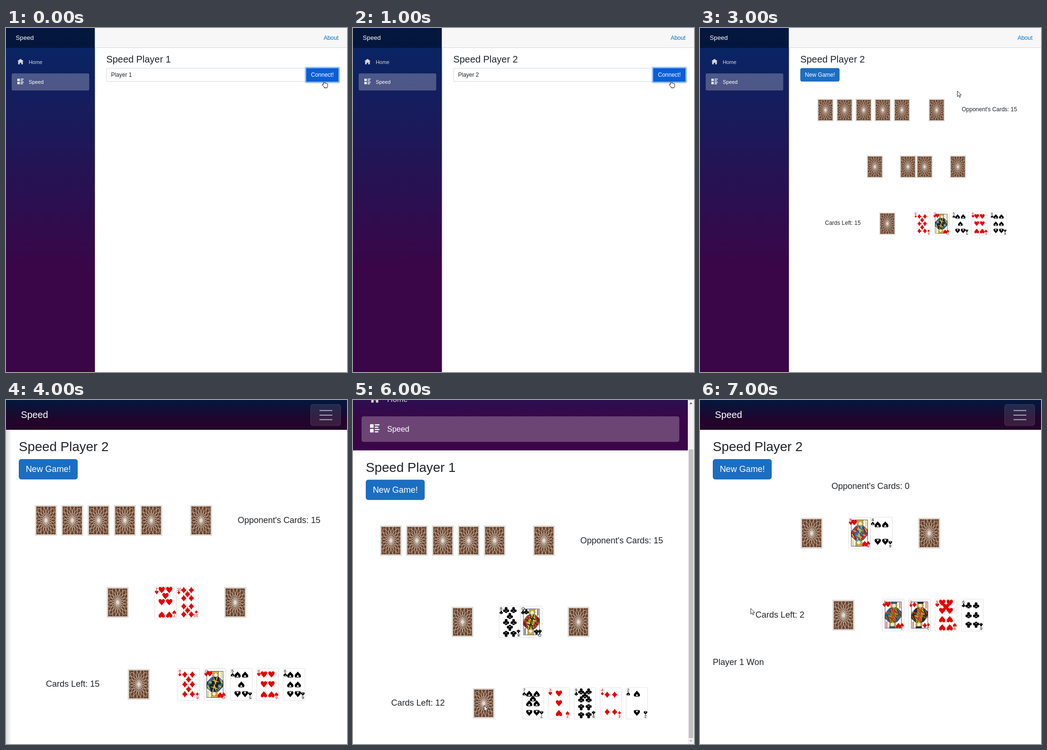
An HTML page that plays this animation: 719 px wide and 727 px high, repeating every 8 s.

```html
<!DOCTYPE html>
<html lang="en">
<head>
<meta charset="utf-8">
<title>Speed</title>
<style>
  html, body { margin: 0; width: 100%; height: 100%; overflow: hidden; background: #fff; }
  svg { display: block; width: 719px; height: 727px; font-family: "Liberation Sans", Arial, sans-serif; }
  .scene { visibility: hidden; animation: show 8s step-end infinite; }
  @keyframes show {
    0% { visibility: visible; }
    12.5%, 100% { visibility: hidden; }
  }
</style>
</head>
<body>
<svg id="stage" viewBox="0 0 719 727"></svg>
<script>
const INK = '#212529', RED = '#e60000';

const rect = (x, y, w, h, fill, extra = '') =>
  `<rect x="${x}" y="${y}" width="${w}" height="${h}" fill="${fill}" ${extra}/>`;
const text = (x, y, size, str, fill = INK, extra = '') =>
  `<text x="${x}" y="${y}" font-size="${size}" fill="${fill}" ${extra}>${str}</text>`;
const path = (d, fill, extra = '') => `<path d="${d}" fill="${fill}" ${extra}/>`;
const at = (x, y, scale, inner) => `<g transform="translate(${x} ${y}) scale(${scale})">${inner}</g>`;
const flipped = inner => `<g transform="rotate(180 23.25 34)">${inner}</g>`;

// Suits are drawn in a 10 unit box around the origin.
const stem = 'M-.7 1L-2 5H2L.7 1z';
const suits = {
  H: 'M0 5C-2 2-5 .3-5-2.2A2.55 2.55 0 0 1 0-3.2A2.55 2.55 0 0 1 5-2.2C5 .3 2 2 0 5z',
  D: 'M0-5.3Q1.8-2 4.4 0Q1.8 2 0 5.3Q-1.8 2-4.4 0Q-1.8-2 0-5.3z',
  S: 'M0-5C2-2 5-.3 5 1.8A2.4 2.4 0 0 1 0 2.8A2.4 2.4 0 0 1-5 1.8C-5-.3-2-2 0-5z' + stem,
  C: 'M-2.3-2.6a2.3 2.3 0 1 1 4.6 0a2.3 2.3 0 1 1-4.6 0zM-5 1.3a2.3 2.3 0 1 1 4.6 0a2.3 2.3 0 1 1-4.6 0z' +
     'M.4 1.3a2.3 2.3 0 1 1 4.6 0a2.3 2.3 0 1 1-4.6 0zM-1-1H1V2H-1z' + stem
};
const colorOf = suit => 'HD'.includes(suit) ? RED : '#000';
const pip = (suit, x, y, size, down) =>
  `<g transform="translate(${x} ${y}) scale(${size / 10})${down ? ' rotate(180)' : ''}">${path(suits[suit], colorOf(suit))}</g>`;

// Middle-column pips as fractions of the pip height.
const middles = { 2: [0, 1], 3: [0, .5, 1], 5: [.5], 7: [.25], 8: [.25, .75], 9: [1 / 6], 10: [1 / 6, 5 / 6] };
const tall = ['7H', '8C', '9H', '9C', '10D'];

function pips(rank, suit) {
  const top = tall.includes(rank + suit) ? 8.3 : rank == 4 ? 15.5 : 13.3;
  const put = (x, v) => pip(suit, x, top + v * (68 - 2 * top), 13, v > .5);
  const rows = rank < 4 ? 0 : rank < 6 ? 2 : rank < 9 ? 3 : 4;
  let out = (middles[rank] || []).map(v => put(23.25, v)).join('');
  for (let i = 0; i < rows; i++) out += put(15.3, i / (rows - 1)) + put(31.2, i / (rows - 1));
  return out;
}

// Robe, sleeve and trim colours of the court cards.
const robes = {
  QC: ['#d9b92c', '#d2352b', '#20242e'], QH: ['#1d2230', '#3f78b5', '#d9b92c'],
  JS: ['#c2a424', '#2f63a0', '#20242e'], KH: ['#3f78b5', '#d2352b', '#d9b92c'],
  JH: ['#a18a1c', '#2f63a0', '#d2352b'], JD: ['#b89f22', '#2a2c34', '#d2352b']
};

function court(rank, suit) {
  const [robe, sleeve, trim] = robes[rank + suit];
  const line = 'stroke="#222" stroke-width=".5"';
  const half =
    path('M6 34V30L15 20 21 17H29L40.500 27V34z', robe, line) +
    path('M6.500 34L14 21 19 19 16 34z', sleeve, line) +
    path('M31 18L40.500 27V34H35z', sleeve, line) +
    path('M20 18L25 34M28 18L24 34M18 25L32 29M10 28L16 31M35 24L39 32', 'none', `stroke="${trim}" stroke-width="2"`) +
    path('M20 19L33 31M15 24L22 33M30 21L36 33', 'none', 'stroke="#111" stroke-width=".9"') +
    path('M19 18Q16 13 20 9H30Q33 14 30 18z', '#d9b92c', line) +
    `<ellipse cx="25" cy="14" rx="3.600" ry="4.600" fill="#fff" stroke="#333" stroke-width=".4"/>` +
    path('M19 10L18.500 6.500H31.500L31 10z', rank == 'J' ? sleeve : '#e3c53a', line) +
    path('M23.300 13h1M26 13h1M24 16h2', 'none', 'stroke="#222" stroke-width=".6"') +
    path('M36 7V21M38 7V20', 'none', `stroke="${trim}" stroke-width="1"`) +
    pip(suit, 12.3, 12, 11);
  return half + flipped(half) + rect(6, 6.3, 34.5, 55.4, 'none', 'stroke="#223" stroke-width=".8"');
}

function face(x, y, s, code) {
  const suit = code.slice(-1), rank = code.slice(0, -1);
  const corner = text(rank == 10 ? .8 : 2, 9, 9.3, rank, colorOf(suit), rank == 10 ? 'letter-spacing="-.8"' : '') +
    pip(suit, 4.8, 13.4, 7.5);
  return at(x, y, s,
    rect(.25, .25, 46, 67.5, '#fff', 'rx="1.500" stroke="#ccc" stroke-width=".6"') +
    (robes[code] ? court(rank, suit) : pips(rank, suit)) + corner + flipped(corner));
}

const back = (x, y, s) => at(x, y, s, '<use href="#back"/>');
const backs = (x, y, s, n, step) => Array.from({ length: n }, (_, i) => back(x + i * step, y, s)).join('');
const faces = (x, y, s, step, codes) => codes.split(' ').map((c, i) => face(x + i * step, y, s, c)).join('');

const arrow = (x, y) => at(x, y, 1,
  path('M.5.5V12.500L3.300 9.900 5.200 14.200 7.200 13.300 5.300 9.200H9z', '#fff', 'stroke="#111" stroke-width=".9"'));
const hand = (x, y) => at(x, y, 1,
  path('M3.500 9V1.800Q4.600 0 5.700 1.800V6Q7.500 5 8 6.500 9.800 5.700 10.200 7.200 12 6.700 12.200 8.500V11.500Q12 13.500 11 14.500V16H5V14.500Q3 12.500.8 9.500.8 7.600 2.300 8z',
    '#fff', 'stroke="#111" stroke-width="1"'));

const home = 'M4 0l-4 3h1v4h2v-2h2v2h2v-4.030l1 .030-4-3z';
const list = 'M0 0v3h3v-3h-3zm4 0v1h4v-1h-4zm0 2v1h3v-1h-3zm-4 2v3h3v-3h-3zm4 0v1h4v-1h-4zm0 2v1h3v-1h-3z';

// Sidebar links; top is the upper edge of the first one.
function nav(rem, width, top) {
  const link = (y, icon, label, fill) =>
    at(2 * rem, y + .93 * rem, rem * .1375, path(icon, fill)) + text(4 * rem, y + 1.82 * rem, .9 * rem, label, fill);
  const second = top + 3.5 * rem;
  return link(top, home, 'Home', '#d7d7d7') +
    rect(rem, second, width - 2 * rem, 3 * rem, '#fff', `fill-opacity=".25" rx="${rem / 4}"`) +
    link(second, list, 'Speed', '#fff');
}

const heading = (x, y, rem, player) => text(x, y, 1.3 * rem + 4.314, 'Speed Player ' + player);
const newGame = (x, y, rem) =>
  rect(x + .5, y + .5, 6.9 * rem - 1, 2.375 * rem - 1, '#1b6ec2', `rx="${rem / 4}" stroke="#1861ac"`) +
  text(x + .8125 * rem, y + 1.52 * rem, rem, 'New Game!', '#fff');

const desktop = () =>
  rect(0, 0, 187.5, 727, 'url(#side)') + rect(0, 0, 187.5, 42, '#000', 'fill-opacity=".4"') +
  text(20.5, 25, 13.2, 'Speed', '#fff') + nav(12, 187.5, 54) +
  rect(187.5, 0, 531.5, 41.5, '#f7f7f7') + rect(187.5, 41, 531.5, 1, '#d6d5d5') +
  text(701, 24.5, 12, 'About', '#0071c1', 'text-anchor="end"');

const connect = player => desktop() + heading(211.5, 73, 12, player) +
  rect(212, 85, 420, 28, '#fff', 'rx="3" stroke="#ced4da"') + text(221.5, 102.7, 12, 'Player ' + player) +
  rect(630, 82, 74, 34.5, '#98c1fe', 'rx="3"') + rect(633, 85, 68, 28.5, '#0b5ed7', 'rx="1"') +
  text(643, 102.7, 12, 'Connect!', '#fff') + hand(666, 110.5);

const dealt = (player, codes) => desktop() + heading(211.5, 73, 12, player) + newGame(211.5, 84.7, 12) +
  backs(247.5, 149.7, .73, 5, 40.3) + back(482, 149.7, .73) + text(552, 176.3, 12, "Opponent's Cards: 15") +
  back(351.7, 269.5, .73) + backs(421.5, 269.5, .73, 2, 35) + back(526.8, 269.5, .73) +
  text(263.5, 416.3, 12, 'Cards Left: 15') + back(378, 389.7, .73) + faces(451.2, 388.4, .74, 40.3, codes);

const mobile = () =>
  rect(0, 0, 719, 63, 'url(#side)') + rect(0, 0, 719, 63, '#000', 'fill-opacity=".4"') +
  text(31.5, 37.5, 19.8, 'Speed', '#fff') +
  rect(642.5, 9.5, 63, 44.5, '#fff', 'fill-opacity=".1" rx="4.500" stroke="#fff" stroke-opacity=".15"') +
  path('M661 22.300H688M661 32H688M661 41.500H688', 'none', 'stroke="#fff" stroke-opacity=".6" stroke-width="2"') +
  heading(27, 108, 18, 2) + newGame(27, 125, 18);

const scrolled = (piles, left, shift, row) =>
  rect(0, -109.5, 706, 216, 'url(#side)') + nav(18, 706, -28.5) +
  rect(706, 0, 13, 727, '#f1f1f1') + rect(708, 104.5, 9.5, 610, '#c1c1c1') +
  path('M709.500 8.500L712.500 5 715.500 8.500z', '#505050') + path('M709.500 719L712.500 722.500 715.500 719z', '#a3a3a3') +
  heading(27, 151.5, 18, 1) + newGame(27, 168.5, 18) +
  backs(57, 265.2, .985, 5, 54.7) + back(379.7, 265.2, .985) + text(479.3, 302.5, 18, "Opponent's Cards: 15") +
  back(208, 437, .985) + faces(307.8, 435.5, .985, 45.5, piles) + back(452.5, 437, .985) +
  text(135.3 - shift, 646, 18, 'Cards Left: ' + left) + back(307.5 - shift, 609, .985) +
  faces(411.3 - shift, 607.5, .985, 54.8, row);

const scenes = [
  connect(1),
  connect(2),
  dealt(1, '7S QC 8C 3H JS') + rect(710, 0, 9, 727, 'url(#edgeRight)') + arrow(611, 146),
  dealt(2, '8D QH 5S 6H 6S') + arrow(542, 132.5),
  mobile() + rect(0, 63, 12, 664, 'url(#edgeLeft)') +
    backs(61, 222, 1, 5, 55.5) + back(388, 222, 1) + text(488.5, 259.5, 18, "Opponent's Cards: 15") +
    back(212.2, 395.3, 1) + faces(313, 393.5, 1, 46.5, '7H 10D') + back(460, 395.3, 1) +
    text(84.3, 605.5, 18, 'Cards Left: 15') + back(256.7, 568.5, 1) +
    faces(361.7, 567, 1, 55.6, '8D QH 5S 6H 6S'),
  rect(463, 620, 51, 69, '#4dff4d', 'rx="4" filter="url(#blur)"') +
    scrolled('7H QC', 15, 0, '7S 8C 3H') + arrow(328, 477.5),
  scrolled('8C QC', 12, 54.8, '7S 3H 9C 4D 2S') + arrow(276, 645),
  mobile() + text(277.3, 187.5, 18, "Opponent's Cards: 0") +
    back(212.2, 249, 1) + faces(313, 247.3, 1, 46.5, 'KH 4S') + back(460, 249, 1) +
    text(117, 460, 18, 'Cards Left: 2') + back(279.2, 422.3, 1) +
    faces(384.2, 420.5, 1, 55.6, 'JH JD 9H 6C') + text(27, 560, 18, 'Player 1 Won') + arrow(106.5, 440)
];

const petals = Array.from({ length: 18 }, (_, i) =>
  `<ellipse cy="-14" rx="5.500" ry="14" transform="rotate(${i * 20})"/>`).join('');
const fade = (id, from, to) => `<linearGradient id="${id}">
  <stop stop-opacity="${from}"/><stop offset="1" stop-opacity="${to}"/></linearGradient>`;

document.getElementById('stage').innerHTML = `<defs>
  <linearGradient id="side" x2="0" y2="1"><stop stop-color="#052767"/><stop offset=".7" stop-color="#3a0647"/></linearGradient>
  ${fade('edgeLeft', .14, 0)}${fade('edgeRight', 0, .13)}
  <filter id="blur" x="-1" y="-1" width="3" height="3"><feGaussianBlur stdDeviation="9"/></filter>
  <clipPath id="inner">${rect(3, 3, 40.5, 59, '#000')}</clipPath>
  <g id="back">${rect(0, 0, 46.5, 65, '#dedad5', 'rx="1"')}${rect(3, 3, 40.5, 59, '#6b432b')}
    <g clip-path="url(#inner)"><g transform="translate(23.250 32.500) scale(.92 1.150)" fill="none" stroke="#d9d0c6" stroke-width=".8">
      ${petals}<circle r="30" stroke-dasharray="2 2"/><circle r="3" fill="#e4ddd5"/></g></g></g>
</defs>` + scenes.map((inner, i) =>
  `<g class="scene" style="animation-delay:${i ? i - 8 : 0}s">${inner}</g>`).join('');
</script>
</body>
</html>
```
